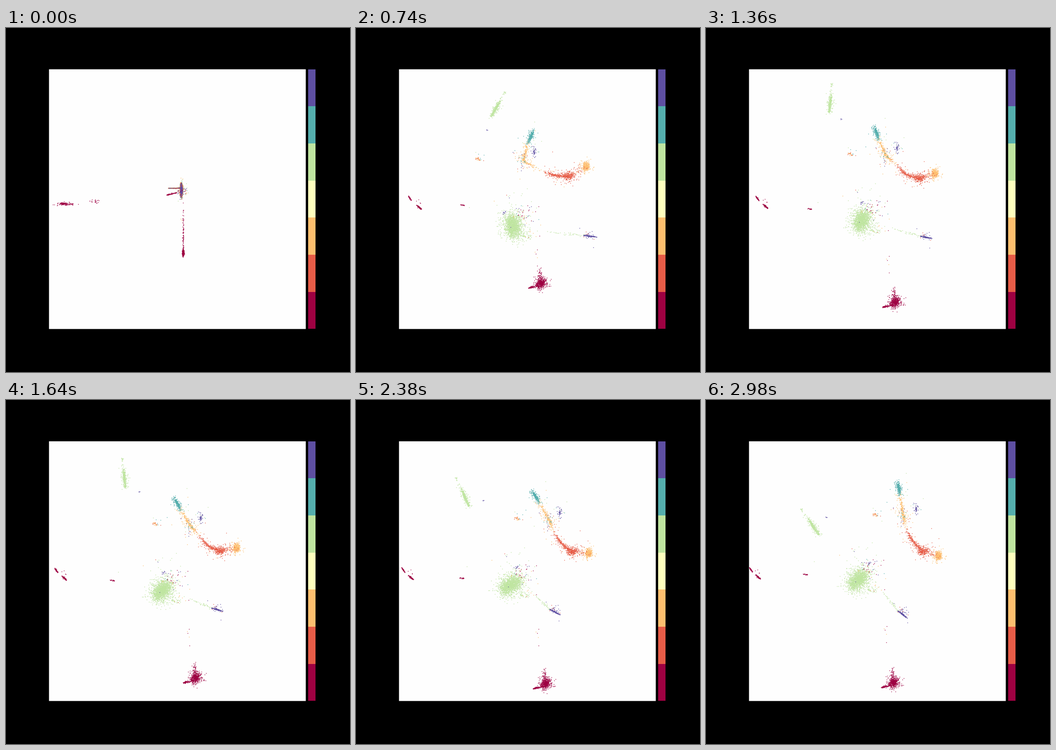
Write a matplotlib script that moves like this. It is 748 px wide and 748 px high and loops after 3.03 s.

```python
import numpy as np
import matplotlib.pyplot as plt
from matplotlib.animation import FuncAnimation
from matplotlib.patches import Rectangle

SIZE, DPI = 748, 100
LOOP, STEP, LAST = 3030, 20, 2980
TIMES = np.arange(0, LAST + 1, STEP)
KEYS = np.array([0, 440, 1060, 1640, LAST], float)
HUB = 381 + 352j
COLOURS = dict(m="#9e0142", r="#e75c47", o="#fdbf6f", y="#ffffbe",
               g="#bfe5a0", t="#54aead", p="#5e4fa2")

# 0..1: how far the dots have unfolded from where they start
GROW = 1 - (1 - np.minimum(TIMES / KEYS[1], 1)) ** 2

rng = np.random.default_rng(12)
tints, tracks = [], []


def path(*points, origin=HUB, power=.7):
    """Smooth track over TIMES from origin through points x + yj."""
    if len(points) == 2:
        a, b = points
        u = (KEYS[1:] - KEYS[1]) / (LAST - KEYS[1])
        points = a + (b - a) * u ** power
    k = np.array([origin, *points])
    m = np.gradient(k, KEYS, edge_order=2)
    i = np.clip(np.searchsorted(KEYS, TIMES, "right") - 1, 0, len(KEYS) - 2)
    h = np.diff(KEYS)[i]
    u = (TIMES - KEYS[i]) / h
    return ((1 + 2 * u) * (1 - u) ** 2 * k[i] + u * (1 - u) ** 2 * h * m[i]
            + u * u * (3 - 2 * u) * k[i + 1] - u * u * (1 - u) * h * m[i + 1])


def gauss(n, sx, sy):
    return rng.normal(0, sx, n) + 1j * rng.normal(0, sy, n)


def hub_shape(n):
    """A short upright bar with a thin arm to the left."""
    arm = rng.random(n) < .1
    return np.where(arm, -28 * rng.random(n) - 4j, gauss(n, 1.2, 6))


def cloud(colours, n, *nodes, sd=(1, 1), mid=None, halo=.2, wide=2.5, start=None):
    """Dots scattered along a moving polyline; some lie in a wider halo."""
    t = rng.random(n) if mid is None else np.clip(rng.normal(*mid, n), 0, 1)
    last = len(nodes) - 1
    w = np.clip(1 - abs(t[:, None] * last - np.arange(last + 1)), 0, 1)
    off = gauss(n, *sd)
    off[rng.random(n) < halo] *= wide
    first = hub_shape(n) if start is None else gauss(n, *start)
    wobble = gauss(n * len(TIMES), .3, .3).reshape(n, -1)
    tracks.append(w @ np.array(nodes) + off[:, None] * GROW
                  + first[:, None] * (1 - GROW) + wobble * GROW)
    tints.append(rng.choice(list(colours), n))


def streak(colours, n, centre, half, **kw):
    cloud(colours, n, centre - half * GROW, centre + half * GROW, **kw)


# large green blob, its tail, and the chain to the purple streak
top = path(346 + 408j, 337 + 406j, 348 + 402j, 341 + 378j)
low = path(353 + 436j, 340 + 438j, 330 + 426j, 320 + 403j)
blob = (top + low) / 2
cloud("g", 1600, top, low, sd=(8, 7.5), halo=.3, wide=1.8)
cloud("g", 30, blob + (17 + 20j) * GROW, blob + (40 + 25j) * GROW, sd=(1.5, 1.5))

near = path(480 + 434j, 484 + 451j, 447 + 452j, 417 + 458j)
far = path(506 + 437j, 508 + 454j, 471 + 459j, 437 + 474j)
cloud("g", 38, blob + (40 + 10j) * GROW, near, mid=(.75, .25))
cloud("p", 110, near, far, sd=(.5, .4), mid=(.5, .26), halo=.05)
cloud("pppr", 30, near + 11 * GROW, sd=(5, 4.5))

# upper green arc with a detached tip
tail = path(317 + 224j, 280 + 184j, 259 + 189j, 245 + 292j)
tip = path(340 + 194j, 293 + 140j, 254 + 142j, 216 + 250j)
cloud("g", 320, tail, tip, sd=(1.3, 1.3), mid=(.42, .24), halo=.28, wide=3)
cloud("g", 12, tail + 1.2 * (tip - tail), tail + 1.35 * (tip - tail))
cloud("p", 4, path(292 + 256j, 296 + 204j, 290 + 199j, 262 + 255j), halo=0)

# one ribbon: teal head, orange neck, red body, orange end
ribbon = [
    path(395 + 247j, 371 + 218j, 366 + 213j, 417 + 178j),
    path(376 + 268j, 372 + 246j, 379 + 238j, 421 + 205j),
    path(357 + 303j, 380 + 283j, 402 + 275j, 429 + 252j),
    path(403 + 326j, 409 + 302j, 418 + 294j, 434 + 280j),
    path(430 + 326j, 430 + 320j, 440 + 318j, 450 + 308j),
    path(450 + 325j, 462 + 325j, 466 + 328j, 472 + 329j),
    path(486 + 303j, 493 + 310j, 501 + 321j, 505 + 338j),
]
cloud("t", 230, *ribbon[:2], sd=(1.5, 1.5), mid=(.45, .26), halo=.25, wide=3)
cloud("ttgo", 22, ribbon[1], sd=(8, 7))
cloud("o", 200, *ribbon[1:4], sd=(1.6, 1.6), mid=(.4, .22), halo=.25, wide=3)
cloud("ooorpt", 55, ribbon[2], sd=(9, 10), wide=2)
cloud("r", 200, *ribbon[3:6], sd=(1.6, 1.6), mid=(.55, .25))
cloud("r", 240, ribbon[5], sd=(6, 4.2), halo=.3, wide=2)
cloud("rrro", 30, ribbon[4], sd=(14, 8))
cloud("rro", 45, *ribbon[5:], sd=(3.5, 3.5))
cloud("o", 310, ribbon[6], sd=(3.8, 4.8), wide=1.9)

# small groups
violet = path(374 + 284j, 456 + 237j)
cloud("p", 38, violet, sd=(1.8, 3.8))
cloud("ptg", 9, violet - 5j * GROW, sd=(6, 4))
ember = path(261 + 298j, 368 + 249j)
streak("oor", 26, ember, 4 + 2j, halo=.3, wide=3.5)
cloud("tpg", 5, ember + (3 - 6j) * GROW, sd=(6, 4))
cloud("p", 9, path(323 + 403j, 355 + 354j), sd=(3, 2))

# left maroon streaks
outer = path(119.5 + 371.5j, 97.5 + 369j, origin=124 + 382j, power=1)
inner = path(138.5 + 389j, 113 + 384.5j, origin=130 + 382j, power=1)
wing = path(234 + 378j, 220 + 392j, 231 + 392j, 216 + 379j, origin=193 + 377j)
streak("m", 45, outer, 3.5 + 5j, sd=(.4, .4), halo=0, start=(3, 1))
streak("m", 75, inner, 5 + 4.5j, sd=(.5, .5), mid=(.5, .25), halo=.06, start=(10, 1.5))
cloud("m", 4, inner - 10j * GROW, sd=(5, 3), halo=0, start=(9, 4))
streak("m", 20, wing, 4.5 + .5j, sd=(.4, .4), halo=0, start=(6, 2))

# lower maroon cluster with its tail and spire
right = path(400 + 522j, 414 + 577j, 418 + 598j, 413 + 609j, origin=385 + 489j)
left = path(390 + 530j, 402 + 588j, 406 + 610j, 402 + 620j, origin=385 + 489j)
core = (left + right) / 2
cloud("m", 430, right, left, sd=(4.2, 3.8), halo=.3, wide=2, start=(.9, 3))
root = left + (-15 - 131j) * (1 - GROW)
cloud("m", 85, root, root - 22 + 5j, sd=(.7, .7), halo=.1, start=(1, .5))
spire = core + (-3 - 35j) * GROW - 108j * (1 - GROW)
cloud("m", 110, core, spire, sd=(2.6, 2), mid=(.2, .36), start=(.6, 2))

# stray dots
cloud("mropgtg", 55, blob + (24 - 26j) * GROW, sd=(14, 15), halo=.1, start=(6, 7))
cloud("mpro", 12, blob + (42 + 16j) * GROW, sd=(12, 10), start=(5, 8))
cloud("mog", 5, (blob + core) / 2 + 22 * GROW, sd=(4, 12), halo=0, start=(2, 25))
cloud("gog", 8, blob - 70j * GROW, sd=(24, 16), start=(12, 9))

tint, track = np.concatenate(tints), np.concatenate(tracks)
groups = {c: track[tint == c] for c in "gotrpm"}

fig = plt.figure(figsize=(SIZE / DPI, SIZE / DPI), dpi=DPI, facecolor="black")
ax = fig.add_axes([0, 0, 1, 1])
ax.set(xlim=(0, SIZE), ylim=(SIZE, 0))
ax.axis("off")

TOP, BOTTOM = .12 * SIZE, .875 * SIZE
panel = ax.add_patch(Rectangle((SIZE / 8, TOP), 558.3, BOTTOM - TOP,
                               fc="#fefefe", lw=0, snap=False))
edges = np.round(np.linspace(BOTTOM, TOP, len(COLOURS) + 1))
for c, y0, y1 in zip(COLOURS.values(), edges, edges[1:]):
    ax.add_patch(Rectangle((657, y1), 16, y0 - y1, fc=c, lw=0))

dots = {}
for c in groups:
    dots[c], = ax.plot([], [], "o", ms=1.6 * 72 / DPI, mew=0, color=COLOURS[c])
    dots[c].set_clip_path(panel)


def draw(i):
    step = min(i * 10 // STEP, len(TIMES) - 1)
    for c, line in dots.items():
        z = groups[c][:, step]
        line.set_data(z.real, z.imag)
    return list(dots.values())


anim = FuncAnimation(fig, draw, frames=LOOP // 10, interval=10,
                     repeat=True, repeat_delay=0)
plt.show()
```
